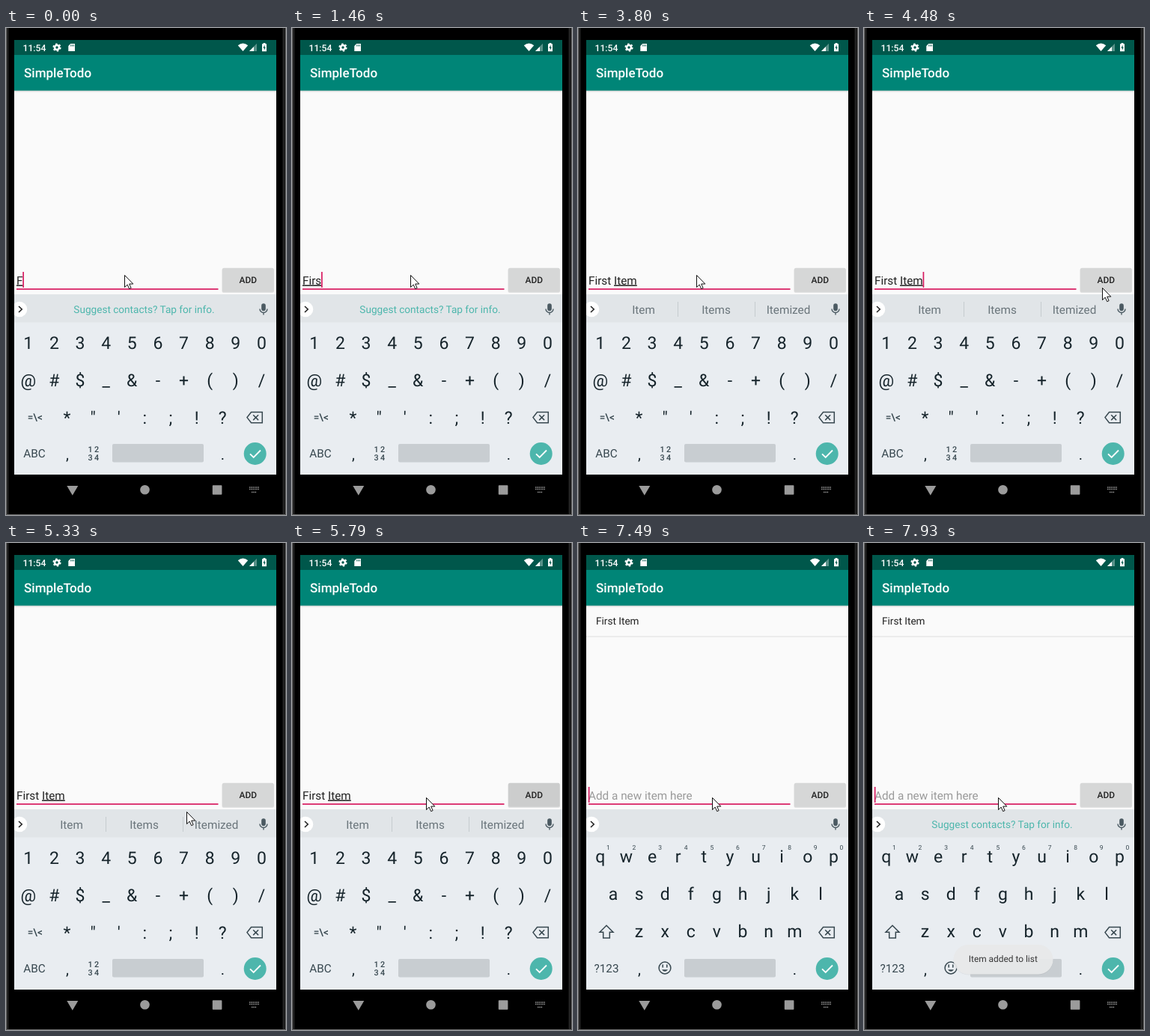
These frames come from a looping animation (374x651 px, 8 s). An HTML page:

```html
<!DOCTYPE html>
<html lang="en">
<head>
<meta charset="utf-8">
<title>SimpleTodo</title>
<style>
  html, body { margin: 0; width: 100%; height: 100%; overflow: hidden; background: #000; }
  svg { display: block; width: 100%; height: 100%; font-family: Roboto, sans-serif; text-rendering: geometricPrecision; }
  text { white-space: pre; }
  .mid { text-anchor: middle; }
  .medium { font-weight: 500; }
  .key { font-size: 23px; fill: #16242b; text-anchor: middle; }
  .label { font-size: 15.3px; fill: #37474f; text-anchor: middle; }
  .line { fill: none; stroke: #37474f; stroke-width: 1.5; }
  .u { text-decoration: underline; text-decoration-thickness: 1px; text-decoration-skip-ink: none; }
</style>
</head>
<body>
<svg viewBox="0 0 374 651" preserveAspectRatio="none">
  <defs>
    <linearGradient id="shade" x2="0" y2="1">
      <stop stop-color="#000" stop-opacity=".16"/><stop offset="1" stop-color="#000" stop-opacity="0"/>
    </linearGradient>
    <clipPath id="screen"><rect x="11" y="16" width="350" height="581"/></clipPath>
  </defs>

  <!-- Phone body -->
  <rect width="374" height="651"/>
  <path d="M2 0V651M371 0V651" stroke="#222" stroke-width="3"/>
  <path d="M.5 0V650.5H373.5V0" fill="none" stroke="#666"/>

  <!-- App -->
  <rect x="11" y="16" width="350" height="581" fill="#fafafa"/>
  <rect x="11" y="16" width="350" height="20" fill="#00574b"/>
  <rect x="11" y="36" width="350" height="47.7" fill="#008577"/>
  <rect x="11" y="83.7" width="350" height="2.5" fill="url(#shade)"/>
  <g fill="#fff">
    <text x="22.5" y="30.5" font-size="12.2" class="medium">11:54</text>
    <circle cx="68" cy="26" r="3" fill="none" stroke="#fff" stroke-width="2.6"/>
    <circle cx="68" cy="26" r="4.8" fill="none" stroke="#fff" stroke-width="1.6" stroke-dasharray="2.5 2.53"/>
    <path d="M86.2 21H92V31H83.3V24Z"/>
    <path d="M86.7 22.3V24.5M88.6 22.3V24.5M90.4 22.3V24.5" stroke="#00574b" stroke-width=".9"/>
    <path d="M309.8 23.3Q316.5 17.7 323.2 23.3L316.5 31Z"/>
    <path d="M335 20.8V31H325Z" opacity=".35"/>
    <path d="M331 25V31H325Z"/>
    <path d="M342 21.3H343.6V20H346.4V21.3H348V31.2H342Z"/>
    <path d="M345.6 22.8L343.4 26.8H344.8V29.8L346.8 25.8H345.6Z" fill="#00574b"/>
    <text x="24" y="66.3" font-size="17.02" class="medium">SimpleTodo</text>
  </g>
  <g id="item">
    <text x="24" y="109.3" font-size="13.6" fill="#212121">First Item</text>
    <path d="M11 125H361" stroke="#dedede"/>
  </g>

  <!-- Input row -->
  <text id="input" x="14" y="342.5" font-size="15.3" fill="#212121"><tspan id="plain"></tspan><tspan id="composing" class="u"></tspan></text>
  <text id="hint" x="14" y="342.5" font-size="15.3" fill="#9a9a9a">Add a new item here</text>
  <rect x="14" y="348.2" width="269.5" height="1.7" fill="#d81b60"/>
  <rect id="caret" y="326" width="1.7" height="21" fill="#d81b60"/>
  <rect x="288.5" y="321.5" width="69.5" height="32.2" rx="2" fill="#000" opacity=".13"/>
  <rect id="button" x="289" y="320.7" width="68.5" height="31.8" rx="2"/>
  <text x="323.2" y="341.1" font-size="11.9" fill="#212121" class="mid medium">ADD</text>

  <!-- Keyboard -->
  <rect x="11" y="356" width="350" height="38" fill="#e1e5e8"/>
  <rect x="11" y="393.5" width="350" height="203.5" fill="#e9edf1"/>
  <circle cx="18" cy="376" r="10.3" fill="#fff" clip-path="url(#screen)"/>
  <path d="M17 372L21.2 376L17 380" fill="none" stroke="#222" stroke-width="1.6"/>
  <g stroke="#4b5a62" fill="none" stroke-width="1.4">
    <rect x="341.9" y="369" width="4.2" height="8.6" rx="2.1" fill="#4b5a62"/>
    <path d="M339 375.5A5 5 0 0 0 349 375.5M344 380.5V383.5"/>
  </g>
  <text id="info" x="184.5" y="381" font-size="13.6" fill="#4db6ac" class="mid">Suggest contacts? Tap for info.</text>
  <g id="words" font-size="15.3" fill="#6a757b" class="mid">
    <path d="M133.5 366V386M236.5 366V386" stroke="#c6cbcf"/>
    <text x="87.5" y="381.5"></text><text x="184.5" y="381.5"></text><text x="281" y="381.5"></text>
  </g>
  <g id="symbols">
    <text x="38.8" y="525" class="label medium" style="font-size:13.6px">=\&lt;</text>
    <text x="38" y="574" class="label">ABC</text>
    <g class="mid medium" font-size="10.8" fill="#37474f">
      <text x="112.5" y="567">1</text><text x="121" y="567">2</text>
      <text x="112.5" y="578">3</text><text x="121" y="578">4</text>
    </g>
  </g>
  <g id="letters">
    <path class="line" d="M38 511.2L47 520.2H42.3V528H33.7V520.2H29Z"/>
    <text x="38" y="574" class="label">?123</text>
    <circle class="line" cx="116" cy="568" r="7.9"/>
    <path class="line" d="M112 570.2Q116 575.5 120 570.2Z" style="fill:#37474f;stroke:none"/>
    <path class="line" d="M113.2 564V567M118.8 564V567" stroke-linecap="round"/>
  </g>
  <path class="line" d="M327.5 513.5H342.3V527.8H327.5L322 520.6ZM330.2 517.2L337.1 524.1M337.1 517.2L330.2 524.1"/>
  <text x="82" y="577" class="key" style="font-size:20px">,</text>
  <text x="289.5" y="577" class="key" style="font-size:20px">.</text>
  <rect x="142" y="556" width="122" height="24.5" rx="2" fill="#c8cdd1"/>
  <circle cx="332.7" cy="569" r="15" fill="#4db6ac"/>
  <path d="M326 569.3L330.7 574L340 564.5" fill="none" stroke="#fff" stroke-width="1.8"/>

  <!-- Navigation bar -->
  <g fill="#9b9b9b">
    <path d="M81.3 612H96.3L88.8 624.7Z"/>
    <circle cx="185.5" cy="617.3" r="6.3"/>
    <rect x="275.8" y="611.3" width="12.6" height="12.4" rx=".8"/>
    <path d="M325 614H338M325 616.5H338M328 620.5H335" stroke="#9b9b9b" stroke-width="1.4" stroke-dasharray="1.4 .9"/>
  </g>

  <g id="toast">
    <rect x="119.5" y="537" width="133" height="39.5" rx="19.7" fill="#000" opacity=".05" transform="translate(0 1)"/>
    <rect x="119.5" y="537" width="133" height="39.5" rx="19.7" fill="#e8e9ea"/>
    <text x="185.8" y="560.3" font-size="11.9" fill="#2b2b2b" class="mid">Item added to list</text>
  </g>
  <path id="pointer" d="M.5 .5V16.6L4.2 13.1L6.7 18.7L9.1 17.6L6.7 12.1H11.8Z" fill="#fff" stroke="#111" stroke-linejoin="round"/>
</svg>
<script>
const LOOP = 8000, KEY_STEP = 34.62;
const $ = id => document.getElementById(id);

function addKeys(layer, chars, x, y, className = 'key', size) {
  [...chars].forEach((char, i) => {
    const key = document.createElementNS('http://www.w3.org/2000/svg', 'text');
    key.setAttribute('x', x + i * KEY_STEP);
    key.setAttribute('y', y);
    key.setAttribute('class', className);
    if (size) key.style.fontSize = size + 'px';
    key.textContent = char;
    $(layer).append(key);
  });
}
addKeys('symbols', '1234567890', 29.8, 428.7);
addKeys('symbols', '@#$_&-+()/', 29.8, 478.5);
addKeys('symbols', '*"\':;!?', 81.5, 528.5);
addKeys('letters', 'qwertyuiop', 29.8, 427);
addKeys('letters', '1234567890', 40.3, 409.5, 'label', 8.5);
addKeys('letters', 'asdfghjkl', 47, 476.8);
addKeys('letters', 'zxcvbnm', 81.5, 526.7);

// Each step changes only the listed properties and keeps the rest.
const steps = [
  [0, { plain: '', composing: 'F', caret: true, strip: 'info', pointer: [158, 330],
        button: '#d6d7d7', added: false, letters: false, toast: 0 }],
  [150, { composing: 'Fi' }],
  [620, { composing: 'Fir' }],
  [1030, { caret: false }],
  [1460, { composing: 'Firs', caret: true }],
  [1900, { strip: ['Firs', 'First', 'Fits'] }],
  [2170, { composing: 'First', strip: ['First', 'Firsts', 'Firstborn'] }],
  [2420, { plain: 'First ', composing: '' }],
  [2690, { strip: ['thing', 'time', 'one'] }],
  [2970, { composing: 'I' }],
  [3240, { composing: 'It', strip: ['It', 'Its', 'Item'] }],
  [3380, { composing: 'Ite', strip: ['Item', 'Items', 'Itemized'] }],
  [3520, { composing: 'Item' }],
  [3800, { caret: false }],
  [4190, { caret: true, pointer: [190, 341] }],
  [4340, { pointer: [262, 348] }],
  [4480, { pointer: [318, 347] }],
  [4630, { caret: false, pointer: [337, 347] }],
  [5210, { pointer: [308, 354] }],
  [5330, { pointer: [241, 359] }],
  [5490, { pointer: [196, 345] }],
  [5640, { pointer: [179, 340], button: '#c6c7c7' }],
  [5780, { button: '#cccdcd' }],
  [5930, { button: '#d2d3d3', strip: null }],
  [6200, { plain: '', composing: '', added: true }],
  [6470, { button: '#d4d5d5' }],
  [6620, { button: '#d5d6d6' }],
  [6760, { button: '#d6d7d7' }],
  [7490, { caret: true, letters: true }],
  [7640, { strip: 'info', toast: .3 }],
  [7780, { toast: .65 }],
  [7930, { toast: .93 }],
];
let last = {};
const states = steps.map(([time, change]) => last = { ...last, ...change, time });

const show = (id, visible) => $(id).style.display = visible ? '' : 'none';

function render(s) {
  $('plain').textContent = s.plain;
  $('composing').textContent = s.composing;
  $('caret').setAttribute('x', 13.8 + $('input').getComputedTextLength());
  show('caret', s.caret);
  show('hint', !(s.plain + s.composing));
  show('item', s.added);
  show('info', s.strip === 'info');
  const words = Array.isArray(s.strip);
  show('words', words);
  if (words) $('words').querySelectorAll('text').forEach((el, i) => el.textContent = s.strip[i]);
  show('symbols', !s.letters);
  show('letters', s.letters);
  $('button').setAttribute('fill', s.button);
  $('toast').setAttribute('opacity', s.toast);
  $('pointer').setAttribute('transform', `translate(${s.pointer})`);
}

let shown, start;
function tick(now) {
  start ??= now;
  const t = (now - start) % LOOP;
  const state = states.findLast(s => s.time <= t) || states[0];
  if (state !== shown) render(shown = state);
  requestAnimationFrame(tick);
}
render(shown = states[0]);
requestAnimationFrame(tick);
</script>
</body>
</html>
```
